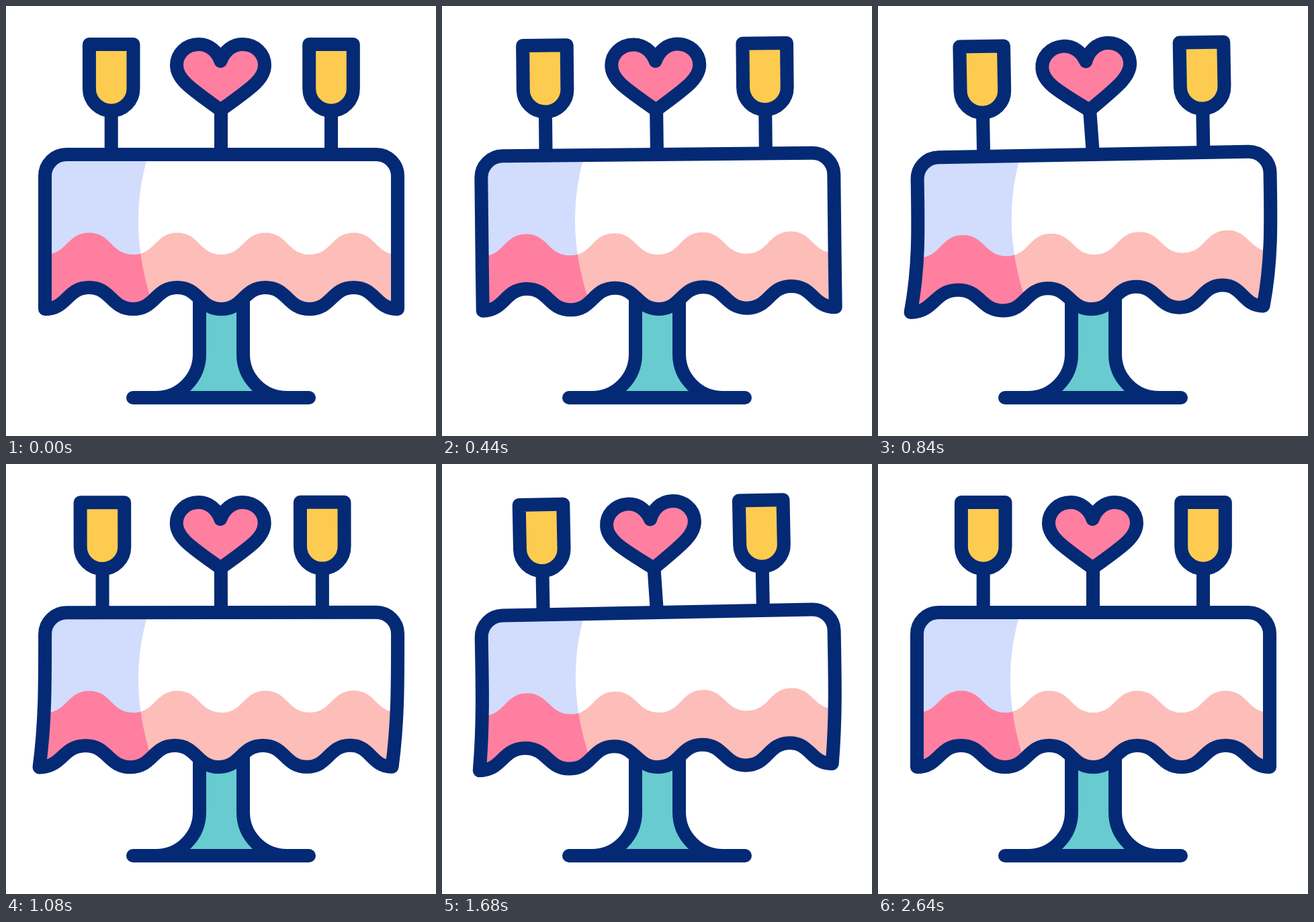
Write an HTML page with a canvas that moves like this. It is 640 px wide and 640 px high and loops after 2.72 s.

```html
<!DOCTYPE html>
<html>
<head>
<meta charset="utf-8">
<style>
  html, body { margin: 0; height: 100%; overflow: hidden; background: #fff; }
  canvas { display: block; }
</style>
</head>
<body>
<canvas id="stage" width="640" height="640"></canvas>
<script>
const ctx = document.getElementById('stage').getContext('2d');
const LOOP = 2720;
const PIVOT = { x: 320, y: 221 };
const NAVY = '#042a75', PINK = '#ff7fa1', BLUSH = '#fdbdb9',
      LAVENDER = '#d2dcfd', YELLOW = '#fdcb50', TEAL = '#67cbd0';

// Keys are [time in ms, value]; values ease in and out between them.
const tilt = [[0, 0], [260, -3.95], [640, 3.3], [925, -2.2], [1240, 2.1], [1600, -1.3], [1960, 0]];
const sway = [[0, 0], [250, -20], [580, 13], [860, -14], [1000, -12], [1260, 2], [1440, -5], [1740, -7], [1980, 0]];
const slide = [[0, 0], [260, -13.5], [660, 13], [1040, -14], [1420, 14], [1740, -8], [2000, 0]];
const nod = [[0, 0], [260, -11.8], [640, 12], [925, -8.5], [1240, 8.5], [1580, -6], [1880, 2], [2240, -1.2], [2440, 0.5], [2620, 0]];

function valueAt(keys, t) {
  const i = keys.findIndex(key => key[0] > t);
  if (i < 0) return keys[keys.length - 1][1];
  const [t0, v0] = keys[i - 1], [t1, v1] = keys[i];
  const p = (t - t0) / (t1 - t0);
  return v0 + (v1 - v0) * p * p * (3 - 2 * p);
}

// Scalloped edge running from right to left.
function scallop(trough, crest, shift) {
  const points = Array.from({ length: 9 }, (_, i) => {
    const u = 1 - i / 4;
    return [320.5 + 262.5 * u + shift * (0.45 + 0.55 * u ** 4), i % 2 ? crest : trough];
  });
  let d = '';
  for (let i = 1; i < 9; i++) {
    const [x0, y0] = points[i - 1], [x1, y1] = points[i], mid = (x0 + x1) / 2;
    d += `C${mid} ${y0} ${mid} ${y1} ${x1} ${y1}`;
  }
  return d;
}

const clothPath = s => new Path2D(
  `M${58 + s} 451C58 385 58 330 58 253A32 32 0 0 1 90 221H551A32 32 0 0 1 583 253` +
  `C583 330 583 385 ${583 + s} 451${scallop(451, 419, s)}Z`);

const band = new Path2D(`M660 500V370H583${scallop(370, 337.5, 0)}H0V500Z`);
const shade = new Path2D('M0 200H212V221Q179.5 325 217 440V500H0Z');
const stand = new Path2D('M288 430V518A65 65 0 0 1 223 583H418A65 65 0 0 1 353 518V430Z');
const legs = new Path2D('M288 430V518A65 65 0 0 1 223 583M353 430V518A65 65 0 0 0 418 583M189 583H451');
const cup = new Path2D('M-32.8 57H32.8V123A32.8 32.8 0 0 1 -32.8 123Z');
const glassStem = new Path2D('M0 156V217');
const heartStem = new Path2D('M320 155V221');
const heart = new Path2D(
  'M319.5 82C314 67 302 57 287 57C268 57 254 71 254 88C254 110 277 124 319.5 155' +
  'C362 124 385 110 385 88C385 71 371 57 352 57C337 57 325 67 319.5 82Z');

function fill(path, color) {
  ctx.fillStyle = color;
  ctx.fill(path);
}

function outlined(path, color) {
  fill(path, color);
  ctx.stroke(path);
}

function rotated(degrees, draw) {
  ctx.save();
  ctx.translate(PIVOT.x, PIVOT.y);
  ctx.rotate(degrees * Math.PI / 180);
  ctx.translate(-PIVOT.x, -PIVOT.y);
  draw();
  ctx.restore();
}

function drawGlass(x) {
  ctx.save();
  ctx.translate(x, 0);
  ctx.stroke(glassStem);
  outlined(cup, YELLOW);
  ctx.restore();
}

function drawCloth(shift) {
  const cloth = clothPath(shift);
  ctx.save();
  ctx.clip(cloth);
  ctx.fillStyle = '#fff';
  ctx.fillRect(0, 0, 640, 640);
  fill(shade, LAVENDER);
  fill(band, BLUSH);
  ctx.clip(shade);
  fill(band, PINK);
  ctx.restore();
  ctx.stroke(cloth);
}

function render() {
  const t = performance.now() % LOOP;
  ctx.fillStyle = '#fff';
  ctx.fillRect(0, 0, 640, 640);
  ctx.strokeStyle = NAVY;
  ctx.lineWidth = 20;
  ctx.lineCap = ctx.lineJoin = 'round';

  fill(stand, TEAL);
  ctx.stroke(legs);
  rotated(valueAt(tilt, t), () => {
    const offset = valueAt(slide, t);
    drawGlass(156.7 + offset);
    drawGlass(484 + offset);
    drawCloth(valueAt(sway, t));
  });
  rotated(valueAt(nod, t), () => {
    ctx.stroke(heartStem);
    outlined(heart, PINK);
  });
  requestAnimationFrame(render);
}
render();
</script>
</body>
</html>
```
